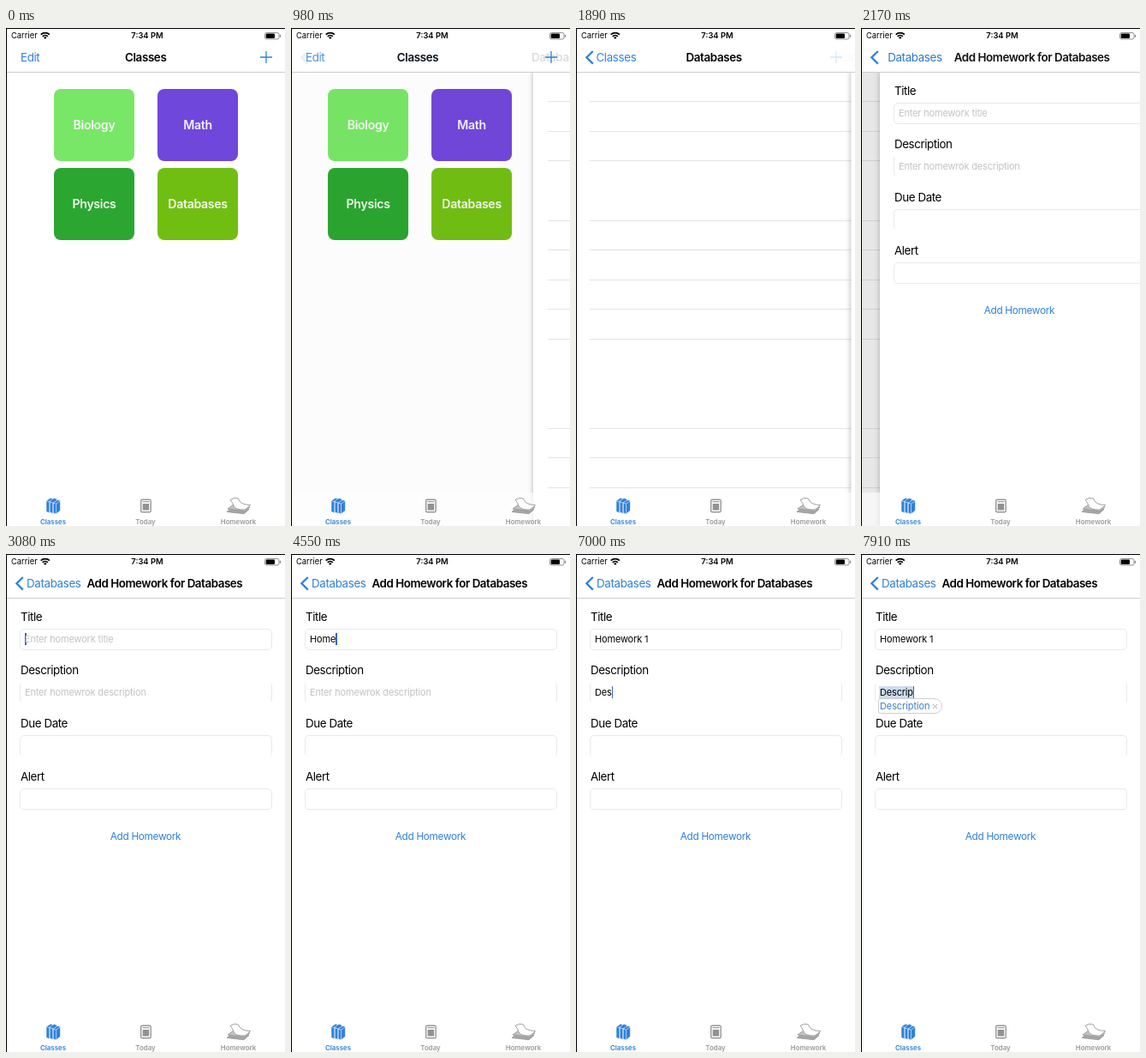
Write an HTML page that moves like this. It is 326x580 px and loops after 8000 ms.

```html
<!DOCTYPE html>
<html lang="en">
<head>
<meta charset="utf-8">
<title>Homework planner</title>
<style>
  :root { --p: 0; --q: 0; --plus: 1; --blue: #2f80dc; }
  html, body { margin: 0; width: 100%; height: 100%; overflow: hidden; background: #fff; }
  #stage {
    position: relative; width: 326px; height: 580px; overflow: hidden;
    background: #fff; color: #000; font-family: Inter, sans-serif;
  }
  #stage * { box-sizing: border-box; }
  .page, .bar, .frame, svg, .text { position: absolute; }
  .text { line-height: 16px; margin-top: -8px; white-space: pre; }
  .mid { transform: translateX(-50%); }
  .blue { color: var(--blue); }

  /* sliding pages */
  .page { left: 0; top: 51px; width: 326px; height: 529px; background: #fff; }
  .page.in { box-shadow: 0 0 6px rgba(0,0,0,.3); }
  .page::after { content: ""; position: absolute; inset: 0; background: #000; opacity: 0; }
  #classes { transform: translateX(calc(var(--p) * -98px)); }
  #classes::after { opacity: calc(var(--p) * .1); }
  #tasks {
    opacity: calc(var(--p) * 1000);
    transform: translateX(calc((1 - var(--p)) * 326px - var(--q) * 98px));
  }
  #tasks::after { opacity: calc(var(--q) * .1); }
  #add { opacity: calc(var(--q) * 1000); transform: translateX(calc((1 - var(--q)) * 326px)); }

  .tile {
    position: absolute; width: 94px; height: 84px; border-radius: 8px;
    font: 600 14.2px/84px Inter, sans-serif; letter-spacing: -.36px;
    text-align: center; color: rgba(255,255,255,.93);
  }
  .row { position: absolute; left: 17px; right: 0; height: 1px; background: #e4e4e4; }

  /* form */
  .group { position: absolute; left: 16px; width: 295px; height: 62px; }
  .group label { position: absolute; left: 1px; top: 0; font-size: 13.4px; line-height: 16px; letter-spacing: -.43px; }
  .field {
    position: absolute; left: 0; top: 22px; width: 295px; height: 25px; padding-left: 5px;
    border: 1px solid #e9e9e9; border-radius: 5px;
    font-size: 11px; line-height: 23px; letter-spacing: -.17px; white-space: pre;
  }
  .field.sides { border-block-color: transparent; }
  .field.open { border-bottom-color: transparent; }
  .field i { font-style: normal; color: #c3c3c7; }
  .field b { display: inline-block; width: 1.5px; height: 14px; margin-right: -1.5px; vertical-align: -3px; background: #3c62c4; }
  .field.marked span { background: #cbdcf1; box-shadow: -1px 0 #cbdcf1; }
  #hint {
    position: absolute; left: 4px; top: 41px; width: 75px; height: 18px; padding-left: 1px;
    background: #fff; border: 1px solid #cfcfcf; border-radius: 2px 9px 9px 2px;
    font-size: 11px; line-height: 16px; letter-spacing: -.1px; color: #3f7fc6;
  }
  #hint svg { left: 62px; top: 5px; }

  /* navigation bar */
  .bar { left: 0; width: 326px; }
  #nav { top: 0; height: 52px; background: #fff; border-bottom: 1px solid #cdcdcd; }
  #tabs { top: 541px; height: 39px; background: rgba(255,255,255,.62); }
  .nav { top: 34px; font-size: 13.4px; letter-spacing: -.38px; }
  .head { font-weight: 600; letter-spacing: -.46px; }
  #edit { left: 17px; opacity: calc(1 - var(--p)); }
  #t1 {
    left: calc(139px - var(--p) * 115px - var(--q) * 40px);
    opacity: calc(1 - var(--q) * 2);
    font-weight: calc(600 - var(--p) * 200);
    color: color-mix(in srgb, var(--blue) calc(var(--p) * 100%), #000);
  }
  #t2 {
    left: calc(130px + (1 - var(--p)) * 174px - var(--q) * 106px);
    opacity: var(--p);
    font-weight: calc(600 - var(--q) * 200);
    color: color-mix(in srgb, var(--blue) calc(var(--q) * 100%), #000);
  }
  #t3 { left: calc(94.5px + (1 - var(--q)) * 212px); opacity: var(--q); }
  #chevron { opacity: var(--p); }
  #plus { opacity: calc(var(--plus) * (1 - var(--q))); }
  .status { top: 9px; font-size: 9.4px; }
  .tab { top: 574.5px; font-size: 7.9px; font-weight: 600; color: #9a9a9a; }
  .tab.blue { color: var(--blue); }
  .frame { inset: 0; border: solid #000; border-width: 1px 0 0 1px; }
</style>
</head>
<body>
<div id="stage">
  <div class="page" id="classes">
    <div class="tile" style="left:56px;top:20px;background:#78e666">Biology</div>
    <div class="tile" style="left:177px;top:20px;background:#7047db">Math</div>
    <div class="tile" style="left:56px;top:112px;background:#2ba630">Physics</div>
    <div class="tile" style="left:177px;top:112px;background:#71be13">Databases</div>
  </div>

  <div class="page in" id="tasks"></div>

  <div class="page in" id="add">
    <div class="group" style="top:14px"><label>Title</label><div class="field" id="title"></div></div>
    <div class="group" style="top:76px"><label>Description</label><div class="field sides" id="desc"></div>
      <div id="hint">Description<svg width="7" height="7"><path d="M1 1 6 6M6 1 1 6" stroke="#aaa"/></svg></div>
    </div>
    <div class="group" style="top:138px"><label>Due Date</label><div class="field open"></div></div>
    <div class="group" style="top:200px"><label>Alert</label><div class="field"></div></div>
    <div class="text mid blue" style="left:163px;top:277.5px;font-size:11.8px;letter-spacing:-.33px">Add Homework</div>
  </div>

  <div class="bar" id="nav">
    <div class="text status" style="left:6px">Carrier</div>
    <div class="text status mid" style="left:165px;font-weight:600">7:34 PM</div>
    <div class="text nav blue" id="edit">Edit</div>
    <div class="text nav" id="t1">Classes</div>
    <div class="text nav" id="t2">Databases</div>
    <div class="text nav head" id="t3">Add Homework for Databases</div>
  </div>

  <div class="bar" id="tabs"></div>
  <div class="text tab mid blue" style="left:55px">Classes</div>
  <div class="text tab mid" style="left:163px">Today</div>
  <div class="text tab mid" style="left:271.5px">Homework</div>

  <svg width="326" height="580" fill="none">
    <g stroke="#000" stroke-width="1.7">
      <path d="M40.7 7.7a7.2 7.2 0 0 1 10.2 0M42.7 9.8a4.4 4.4 0 0 1 6.2 0"/>
      <path d="M45.8 13 44 11.1a2.6 2.6 0 0 1 3.6 0Z" fill="#000" stroke="none"/>
    </g>
    <rect x="302.5" y="5.5" width="16.5" height="7.5" rx="2" stroke="#777" stroke-width=".8"/>
    <rect x="303.7" y="6.6" width="10.3" height="5.3" rx="1" fill="#000"/>
    <path d="M320.4 7.8v3" stroke="#777"/>
    <path id="chevron" d="M19.8 27 12.4 34.3l7.4 7.3" stroke="#2f80dc" stroke-width="2.3"/>
    <path id="plus" d="M297 34h14M304 27v14" stroke="#2f80dc" stroke-width="1.3"/>

    <g fill="#2f80dc" stroke="#fff" stroke-width=".6">
      <path d="M47 550.5l5-3.2 3.5 1v13.5l-4.5 3-4-1.5z"/>
      <path d="M51 551l5-3.5 3.500 1v14l-4.500 3-4-1.500z"/>
      <path d="M55 553l5.500-3.500 3 1v11.500l-5 4-3.500-1.200z"/>
      <path d="M47 550.500l4 1.300v12.500M51 551.800l4 1.200v12.300M55 553l3.600 1.200 4.800-3.500M58.600 554.200v11.500" fill="none"/>
    </g>

    <rect x="157.700" y="549.200" width="11.500" height="14.600" rx="1.500" stroke="#979797" stroke-width="1.400"/>
    <path d="M159.500 551.700h8" stroke="#979797" stroke-width="1.200"/>
    <rect x="159.700" y="554" width="7.500" height="7.600" fill="#929292"/>

    <g stroke="#969696" stroke-width=".9">
      <path d="M258 563.500l7-5 19 2-6 5.200z" fill="#a8a8a8"/>
      <path d="M259 560l7-5 19 3-6 5z" fill="#c4c4c4"/>
      <path d="M262 549.500q5-3.500 9.500-1.500 2 7.500 14 7.500-3 3.500-6.500 5.500-11 .5-13-4.500-1-4-4-7z" fill="#fff"/>
    </g>
  </svg>
  <div class="frame"></div>
</div>

<script>
  const LOOP = 8000, STEP = 70;
  const $ = id => document.getElementById(id);
  const root = document.documentElement.style;
  const clamp = x => Math.min(1, Math.max(0, x));

  // Table separators on a 44pt row pitch; some rows run together
  for (let n = 1; n < 15; n++) {
    if ([4, 10, 11].includes(n)) continue;
    const row = document.createElement('div');
    row.className = 'row';
    row.style.top = Math.floor(n * 34.6) + 'px';
    $('tasks').append(row);
  }

  // Critically damped spring
  function push(t, start) {
    const x = Math.max(0, t - start) * .015;
    const p = 1 - (1 + x) * Math.exp(-x);
    return p > .995 ? 1 : p;
  }

  const titleKeys = [3990, 4130, 4340, 4550, 4760, 4900, 5040, 5250, 5530, 5670];
  const descKeys = [6440, 6790, 7000, 7210, 7350, 7490, 7700];
  const typed = (text, keys, t) => text.slice(0, keys.filter(k => k <= t).length);

  function setField(id, text, placeholder, caret) {
    const bar = caret ? '<b></b>' : '';
    const html = text ? `<span>${text}</span>${bar}` : `${bar}<i>${placeholder}</i>`;
    const el = $(id);
    if (el.innerHTML !== html) el.innerHTML = html;
  }

  function draw(t) {
    root.setProperty('--p', push(t, 938));
    root.setProperty('--q', push(t, 1878));
    root.setProperty('--plus', 1 - .8 * clamp((t - 1600) / 210));

    const blink = t >= 3430 && t < 3640;
    setField('title', typed('Homework 1', titleKeys, t), 'Enter homework title',
      t >= 3080 && t < 5880 && !blink);
    setField('desc', typed('Descrip', descKeys, t), 'Enter homewrok description', t >= 5880);

    const suggest = t >= 7910;
    $('desc').classList.toggle('marked', suggest);
    $('hint').style.display = suggest ? 'block' : 'none';
  }

  let begin;
  function tick(now) {
    begin ??= now;
    const t = (now - begin) % LOOP;
    draw(Math.floor(t / STEP) * STEP);
    requestAnimationFrame(tick);
  }
  draw(0);
  requestAnimationFrame(tick);
</script>
</body>
</html>
```
